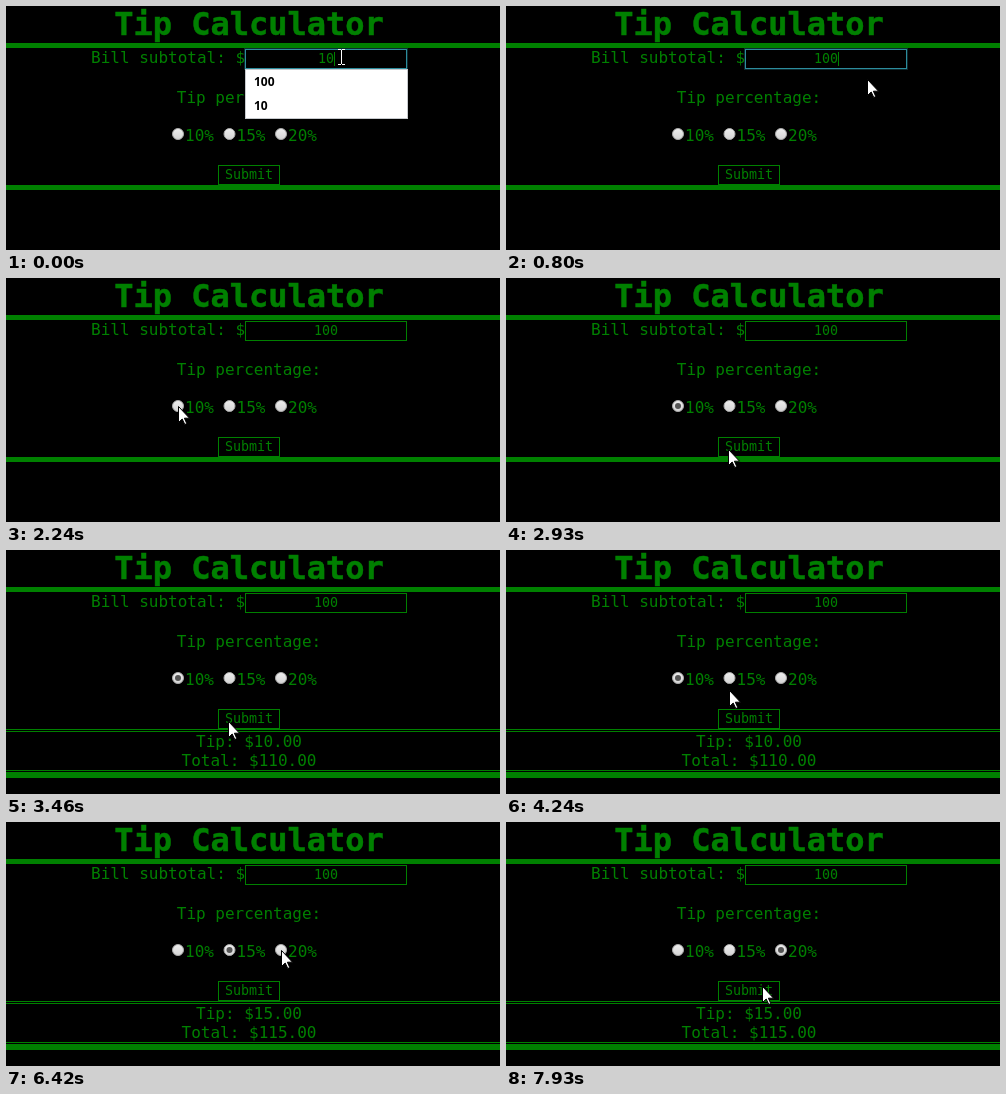
Recreate the animation shown at these times as an HTML page. Size 494 px wide and 244 px high, loop 8 s.

```html
<!DOCTYPE html>
<html lang="en">
<head>
<meta charset="utf-8">
<title>Tip Calculator</title>
<style>
  html, body { margin: 0; width: 100%; height: 100%; overflow: hidden; background: #000; }
  svg { display: block; width: 494px; height: 244px; }
  text { font: 16px "DejaVu Sans Mono", monospace; fill: green; white-space: pre; }
  .title { font-size: 32px; font-weight: bold; stroke: green; stroke-width: .5; }
  .small { font-size: 13.333px; }
  .mid { text-anchor: middle; }
  .option { font: bold 12px "Open Sans", sans-serif; fill: #000; }
  .box { fill: none; stroke: green; }
  .ring { fill: none; stroke: #2c8c9c; }
  .bar { fill: green; }
</style>
</head>
<body>
<svg viewBox="0 0 494 244">
  <defs>
    <linearGradient id="shade" x2="0" y2="1">
      <stop stop-color="#eee"/><stop offset="1" stop-color="#d4d4d4"/>
    </linearGradient>
  </defs>
  <text class="title mid" x="243" y="29">Tip Calculator</text>
  <rect class="bar" y="37" width="494" height="5"/>
  <text x="85" y="57">Bill subtotal: $</text>
  <rect class="box" x="239.5" y="43.5" width="161" height="19"/>
  <text class="small mid" id="amount" x="320" y="57"></text>
  <text class="mid" x="243" y="97">Tip percentage:</text>
  <g id="radios"></g>
  <rect class="box" x="212.5" y="159.5" width="61" height="19"/>
  <text class="small mid" x="243" y="173">Submit</text>

  <g id="result">
    <path class="box" d="M0 179.5H494M0 181.5H494M0 220.5H494M0 222.5H494"/>
    <text class="mid" id="tip" x="243" y="197"></text>
    <text class="mid" id="total" x="243" y="216"></text>
  </g>
  <rect class="bar" id="footer" width="494" height="5"/>

  <g id="focus">
    <rect class="ring" x="238.5" y="42.5" width="163" height="21" opacity=".3"/>
    <rect class="ring" x="239.5" y="43.5" width="161" height="19"/>
    <rect class="bar" id="caret" y="46" width="1" height="14"/>
  </g>
  <g id="menu">
    <rect x="239.5" y="63.5" width="162" height="49" fill="#fff" stroke="#c7cace"/>
    <text class="option" x="248" y="80">100</text>
    <text class="option" x="248" y="104">10</text>
  </g>

  <path id="arrow" d="M.5 .5V16.5L4.2 13 6.8 18.5 8.8 17.6 6.4 12.2H11.5Z" fill="#fff" stroke="#000"/>
  <path id="beam" d="M-3 -7.5H0M1 -7.5H4M.5 -7V7M-3 7.5H0M1 7.5H4" fill="none" stroke="#fff"/>
</svg>
<script>
const LOOP = 8000, STEP = 137;
const $ = id => document.getElementById(id);
const show = (id, on) => $(id).style.display = on ? "" : "none";

const options = [0, 1, 2];
const radio = i => [172 + 51.5 * i, 128];
const labelX = i => radio(i)[0] + 7;
$("radios").innerHTML = options.map(i => `
  <g transform="translate(${radio(i)})">
    <circle r="5.5" fill="url(#shade)" stroke="#aaa"/>
    <circle id="dot${i}" r="3" fill="#555"/>
    <text x="7" y="7">${10 + 5 * i}%</text>
  </g>`).join("");

// Each trip: start time, number of equal jumps, destination
const trips = [
  [680, 4, [440, 140]],
  [1280, 3, [253, 132]],
  [1730, 4, radio(0)],
  [2380, 5, [222, 171]],
  [3590, 7, radio(1)],
  [4665, 4, [230, 155]],
  [5290, 2, [225, 164]],
  [6000, 4, radio(2)],
  [7480, 4, [256, 164]]
];

function pointer(t) {
  let at = [335, 51];
  for (const [start, jumps, goal] of trips) {
    if (t < start) break;
    const u = Math.min(1, (Math.floor((t - start) / STEP) + 1) / jumps);
    at = at.map((from, k) => from + (goal[k] - from) * u);
  }
  return at.map(Math.round);
}

const within = (v, low, size) => v >= low && v <= low + size;
const overText = (x, y) =>
  (within(x, 239, 162) && within(y, 43, 20)) ||
  (within(y, 120, 18) && options.some(i => within(x, labelX(i), 29)));

function draw(t) {
  const amount = t < 250 ? 10 : 100;
  $("amount").textContent = amount;
  $("caret").setAttribute("x", 320 + 4 * String(amount).length);
  show("menu", t < 250);
  show("focus", t < 1130);

  const selected = [2250, 4510, 7070].filter(at => t >= at).length - 1;
  options.forEach(i => show("dot" + i, i === selected));

  const submitted = t >= 3460;
  const tip = t < 5860 ? 10 : 15;
  show("result", submitted);
  $("tip").textContent = `Tip: $${tip}.00`;
  $("total").textContent = `Total: $${100 + tip}.00`;
  $("footer").setAttribute("y", submitted ? 223 : 179);

  const [x, y] = pointer(t);
  const beam = overText(x, y);
  show("beam", beam);
  show("arrow", !beam);
  $(beam ? "beam" : "arrow").setAttribute("transform", `translate(${x} ${y})`);
}

const began = performance.now();
function tick() {
  draw((performance.now() - began) % LOOP);
  requestAnimationFrame(tick);
}
tick();
</script>
</body>
</html>
```
